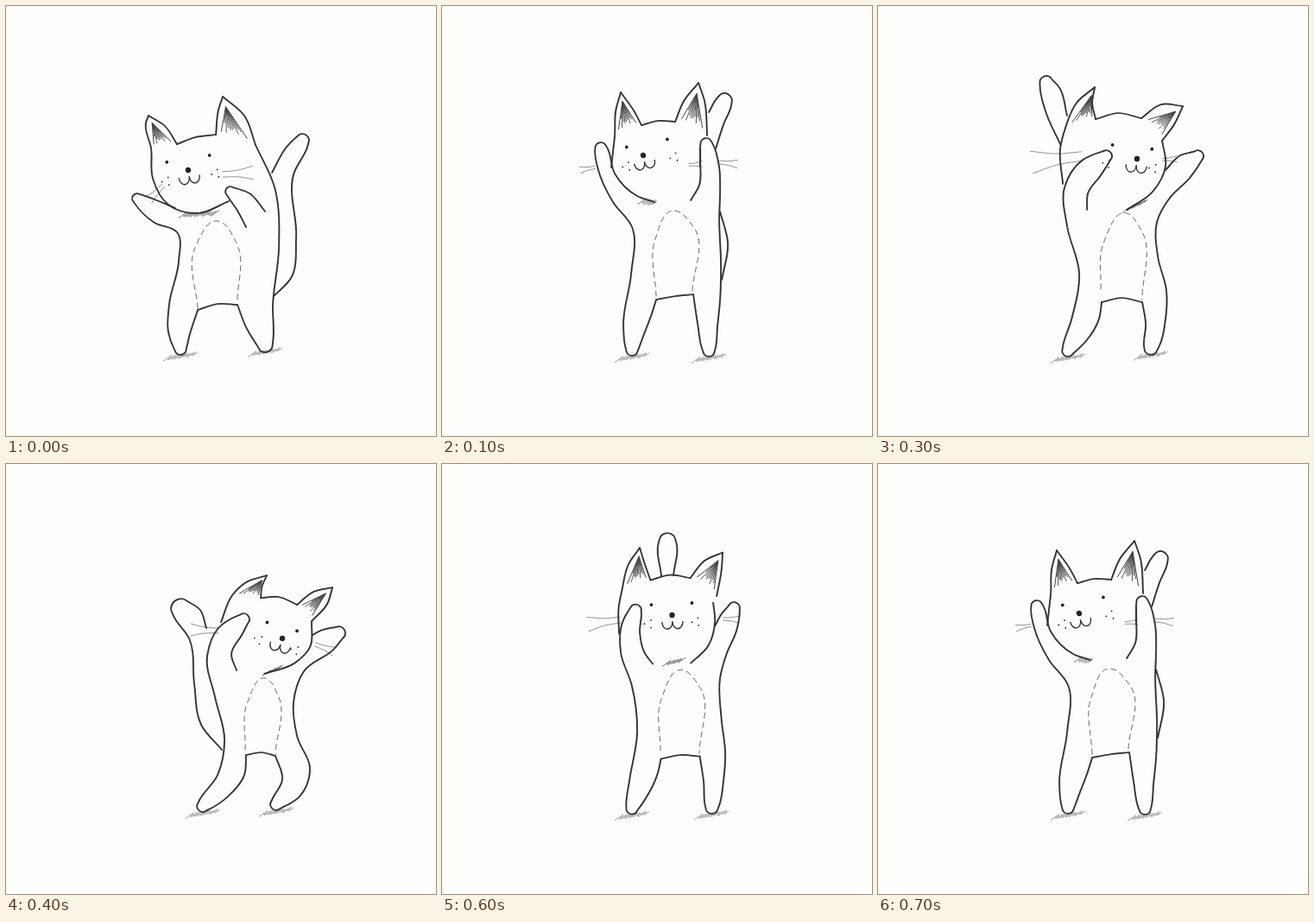
Animation, 498 px wide and 498 px high, one loop 0.8 s. Source, as an HTML page with a canvas:

```html
<!DOCTYPE html>
<html lang="en">
<head>
<meta charset="utf-8">
<title>Dancing cat</title>
<style>
  html, body { margin: 0; height: 100%; overflow: hidden; background: #fdfefc; }
  canvas { display: block; width: 100vw; height: 100vh; }
</style>
</head>
<body>
<canvas id="stage" width="498" height="498"></canvas>
<script>
const ctx = document.getElementById('stage').getContext('2d');
const STEP = 100;

// Key points are x,y; a third number rounds off a paw, foot or tail tip with that radius.
// head: left cheek to ear tip, ear, crown, ear, ear. body: left side, crotch, right side, cheek or arm.
// face: nose x, nose y, tilt in degrees, sideways look, half the eye distance.
// whiskers and chin: start and end of a fan or a scribble.
const parse = v => typeof v === 'string' ? v.split(' ').map(p => p.split(',').map(Number))
  : Array.isArray(v) ? v.map(parse)
  : Object.fromEntries(Object.entries(v).map(([k, x]) => [k, parse(x)]));

const leanLeft = parse({
  tail: ['308,193 325,163 343,156,8 333,195 336,268 330,315 310,336'],
  head: ['258,226 222,240 188,230 170,200 168,165 162,135 165,127', '165,127 184,139 198,160',
    '198,160 219,152 243,149', '243,149 246,120 251,105', '251,105 276,127 289,161'],
  body: ['196,234 172,224 152,223,6 172,251 198,262 200,295 189,345 188,378 202,397,7 212,383 222,352',
    '222,352 245,345 268,346',
    '268,346 278,372 300,392,9 309,345 316,280 311,210 289,161',
    '300,238 282,217 260,215,6 268,237 278,256'],
  belly: '222,350 219,280 245,249 267,275 268,343',
  face: '211,190,-9,2,25',
  whiskers: ['182,208 165,225', '251,195 286,193'],
  chin: '205,242 242,240'
});

const armsUp = parse({
  tail: ['309,123 327,110,9 326,137 317,165', '322,238 331,275 324,317'],
  head: ['196,187 198,168 200,150 201,122 207,100', '207,100 222,121 231,138',
    '231,138 250,133 270,134', '270,134 280,110 297,89', '297,89 304,110 307,150'],
  body: ['246,227 226,220 200,194 184,165,7 181,190 198,227 220,256 219,310 210,370 220,398,7 232,385 243,356 248,340',
    '248,340 270,336 291,334',
    '291,334 296,368 309,399,7 319,370 322,340 323,300 321,245 322,215 321,187 306,160,7 299,172 299,185',
    '299,165 299,180 298,207 288,225'],
  belly: '248,336 247,270 268,237 292,257 290,330',
  face: '233,173,-11,7,24',
  whiskers: ['177,187 160,190', '321,181 342,183', '286,184 301,183'],
  chin: '232,226 246,228'
});

const leanRight = parse({
  tail: ['211,160 194,122 195,89,8 209,93 219,127'],
  head: ['214,206 211,165 217,141 230,112 251,94', '251,94 248,112 252,131',
    '252,131 278,124 305,130', '305,130 328,114 353,116', '353,116 343,137 329,156'],
  body: ['242,236 243,217 258,196 264,174,7 236,179 216,210 219,255 233,310 224,363 220,399,7 240,389 256,362 259,343',
    '259,343 282,338 306,343',
    '306,343 310,368 316,396,8 333,362 334,330 324,290 323,250 338,222 361,199 370,174,7 350,173 333,190',
    '329,156 333,185 318,215 288,236'],
  belly: '258,328 261,275 288,240 305,260 306,340',
  face: '300,177,6,-7,23',
  whiskers: ['236,174 178,181', '330,178 346,177'],
  chin: '288,236 310,226'
});

const crouch = parse({
  tail: ['232,190 224,168 203,168,12 212,202 218,255 226,302 250,331'],
  head: ['249,183 262,152 278,137 302,129', '302,129 296,143 295,155',
    '295,155 316,154 337,163', '337,163 356,148 378,143', '378,143 372,162 354,182'],
  body: ['267,239 261,220 273,198 275,180,7 246,190 233,222 242,270 253,320 245,360 228,396,7 257,385 276,360 278,337',
    '278,337 296,334 312,338',
    '312,338 320,365 313,394,7 340,385 352,355 337,315 333,275 345,240 380,214 385,196,8 364,193 355,198',
    '354,182 352,212 335,230 299,243'],
  belly: '277,331 280,275 300,248 315,268 312,336',
  face: '320,202,16,-4,18',
  whiskers: ['246,193 214,192', '358,209 380,217'],
  chin: '302,242 318,235'
});

const blend = (a, b) => typeof a === 'number' ? (a + b) / 2
  : Array.isArray(a) ? a.map((v, i) => blend(v, b[i]))
  : Object.fromEntries(Object.keys(a).map(k => [k, k === 'tail' ? a[k] : blend(a[k], b[k])]));

const swing = { ...blend(leanRight, armsUp), tail: parse(['254,130 261,90,10 268,129']) };
const dance = [leanLeft, armsUp, swing, leanRight, crouch, leanRight, swing, armsUp];

const mix = (a, b, t) => [a[0] + (b[0] - a[0]) * t, a[1] + (b[1] - a[1]) * t];
const random = n => Math.abs(Math.sin(n * 12.9898) * 43758.5453) % 1;

function roundTips(points) {
  return points.flatMap((p, i) => {
    const [x, y, r] = p;
    if (!r) return [p];
    const from = points[i - 1], mid = mix(from, points[i + 1], 0.5);
    const dir = Math.atan2(y - mid[1], x - mid[0]);
    const side = Math.sign(Math.cos(dir) * (from[1] - y) - Math.sin(dir) * (from[0] - x));
    return [2, 1, 0, -1, -2].map(k => {
      const a = dir + side * k * Math.PI / 4;
      return [x + r * Math.cos(a), y + r * Math.sin(a)];
    });
  });
}

// A smooth path whose tangents follow the circle through neighbouring points.
function curve(points, width, color) {
  const p = roundTips(points);
  const chords = p.slice(1).map((b, i) => {
    const dx = b[0] - p[i][0], dy = b[1] - p[i][1], len = Math.hypot(dx, dy);
    return { len, x: dx / len, y: dy / len };
  });
  const tangents = p.map((_, i) => {
    const a = chords[i - 1] || chords[i], b = chords[i] || a;
    const x = a.x * b.len + b.x * a.len, y = a.y * b.len + b.y * a.len;
    const len = Math.hypot(x, y) || 1;
    return [x / len, y / len];
  });
  ctx.lineWidth = width;
  ctx.strokeStyle = color;
  ctx.beginPath();
  ctx.moveTo(p[0][0], p[0][1]);
  chords.forEach(({ len }, i) => {
    const a = p[i], b = p[i + 1], s = tangents[i], t = tangents[i + 1], h = len / 3;
    ctx.bezierCurveTo(a[0] + s[0] * h, a[1] + s[1] * h, b[0] - t[0] * h, b[1] - t[1] * h, b[0], b[1]);
  });
  ctx.stroke();
}

function pencil(points) {
  curve(points, 1.7, '#2b2b2b');
  ctx.save();
  ctx.translate(0.6, 0.4);
  curve(points, 0.9, '#444a');
  ctx.restore();
}

function ear(corners) {
  const center = [0, 1].map(k => corners.reduce((sum, c) => sum + c[k], 0) / 3);
  const [a, tip, b] = corners.map(c => mix(center, c, 0.65));
  curve([a, tip], 1, '#444');
  curve([tip, b], 1, '#444');
  for (let i = 1; i < 10; i++) {
    const base = mix(a, b, i / 10);
    curve([mix(base, tip, random(i) * 0.4), mix(base, tip, 0.95)], 0.9, '#444');
  }
}

function scribble(a, b, color) {
  const n = Math.round((b[0] - a[0]) / 2.5);
  for (let i = 0; i <= n; i++) {
    const [x, y] = mix(a, b, i / n), h = 1.5 + 2 * random(i + 1);
    curve([[x - h * 1.4, y + h], [x + h * 1.4, y - h]], 0.8, color);
  }
}

function whiskers([root, end]) {
  const dx = end[0] - root[0], dy = end[1] - root[1];
  for (const s of [-1, 1]) {
    const fan = (p, k) => [p[0] - dy * k * s, p[1] + dx * k * s];
    curve([fan(root, 0.09), fan(mix(root, end, 0.5), 0.11), fan(end, 0.22)], 0.8, '#777');
  }
}

function dot(x, y, r) {
  ctx.beginPath();
  ctx.arc(x, y, r, 0, 7);
  ctx.fill();
}

function face([x, y, tilt, look, half]) {
  ctx.save();
  ctx.translate(x, y);
  ctx.rotate(tilt * Math.PI / 180);
  ctx.fillStyle = '#222';
  ctx.lineWidth = 1.4;
  ctx.strokeStyle = '#333';
  dot(0, 0, 3.2);
  for (const s of [-1, 1]) {
    dot(look + s * half, -13, 1.9);
    for (let i = 0; i < 3; i++) {
      const a = i * 2.1 + s;
      dot(look + s * (half + 4) + 5 * Math.cos(a), 9 + 5 * Math.sin(a), 0.9);
    }
    ctx.beginPath();
    ctx.ellipse(s * 6, 8, 6, 8, 0, 0, Math.PI);
    ctx.stroke();
  }
  ctx.restore();
}

function draw(cat) {
  const { head, body } = cat;
  ctx.fillStyle = '#fdfefc';
  ctx.fillRect(0, 0, 498, 498);
  for (const [x, y, r] of body.flat()) {
    if (r && y > 350) scribble([x - 15, y + 11], [x + 17, y + 6], '#888');
  }
  scribble(...cat.chin, '#555');
  cat.whiskers.forEach(whiskers);
  ear([head[0].at(-3), head[1][0], head[1].at(-1)]);
  ear([head[3][0], head[4][0], head[4].at(-1)]);
  ctx.setLineDash([6, 5]);
  curve(cat.belly, 1, '#666');
  ctx.setLineDash([]);
  [...cat.tail, ...head, ...body].forEach(pencil);
  face(cat.face[0]);
}

function tick(now) {
  draw(dance[Math.floor(now / STEP) % dance.length]);
  requestAnimationFrame(tick);
}

ctx.lineCap = ctx.lineJoin = 'round';
draw(dance[0]);
requestAnimationFrame(tick);
</script>
</body>
</html>
```
